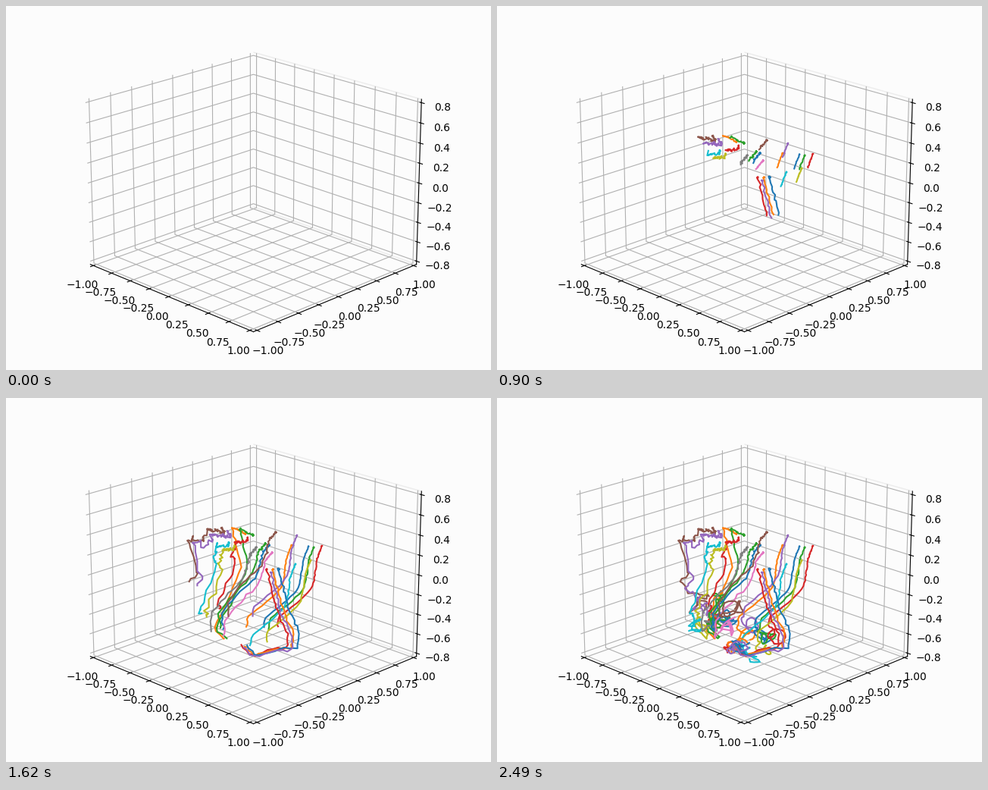
Animation, 640 px wide and 480 px high, one loop 2520 ms. Source, as a matplotlib script:

```python
import numpy as np
import matplotlib.pyplot as plt
from matplotlib.animation import FuncAnimation

FRAMES, INTERVAL = 84, 30
BACK = (0.988, 0.988, 0.988, 1)

fig = plt.figure(figsize=(6.4, 4.8), dpi=100, facecolor=BACK)

# Empty 3D box with a grid
box = fig.add_axes([0, 0, 1, 1], projection="3d", facecolor=BACK)
box.view_init(elev=20, azim=-45)
edge = 25 / 24
box.set(xlim=(-edge, edge), ylim=(-edge, edge), zlim=(-0.8 * edge, 0.8 * edge))
box.set_xticks(np.arange(-4, 5) / 4)
box.set_yticks(np.arange(-4, 5) / 4)
box.set_zticks(np.arange(-4, 5) / 5)
box.xaxis.set_pane_color((1, 1, 1, 0))
box.zaxis.set_pane_color((1, 1, 1, 0))
box.yaxis.set_pane_color(BACK)
box.yaxis.pane.set_edgecolor((0.925, 0.925, 0.925, 1))

# Trails are laid out in stage pixels on top of the box
stage = fig.add_axes([0, 0, 1, 1], facecolor="none")
stage.set(xlim=(0, 640), ylim=(480, 0))
stage.axis("off")

rng = np.random.default_rng(4)
steps = np.arange(1, FRAMES)
BEATS = [1, 15, 30, 38, 42, 46, 50, 54, 65, 83]
trails = []


def ramp(start, end):
    """Smooth rise from 0 to 1 between two steps."""
    u = np.clip((steps - start) / (end - start), 0, 1)
    return u * u * (3 - 2 * u)


def glide(shifts):
    """Softened path through one shift per beat."""
    path = np.pad(np.interp(steps, BEATS, shifts), 1, mode="edge")
    return np.convolve(path, [0.25, 0.5, 0.25], "valid")


def wander(size):
    """Slow random loops that set in once the drop is over."""
    waves = sum(np.sin(2 * np.pi * (steps / period + rng.random()))
                for period in rng.uniform(7, 22, 2))
    return size / 2 * ramp(52, 62) * waves


def bundle(dx, dy, rough, loops, gather, **starts):
    """Strands that share one motion, draw together and then tangle."""
    shared = np.column_stack([glide(dx), glide(dy)])
    centre = np.mean(list(starts.values()), axis=0)
    pull = gather * ramp(34, 54)[:, None]
    for color, start in starts.items():
        noise = rough * (0.3 + 0.7 * ramp(1, 30))[:, None]
        path = start + shared + pull * (centre - start)
        path += noise * rng.normal(size=path.shape)
        path += np.column_stack([wander(loops), wander(0.8 * loops)])
        line, = stage.plot([], [], color="tab:" + color, lw=1.5)
        trails.append((line, path))


# Upper cluster: a hook to the left, then a long drop
bundle([0, 0, -18, -13, -6, -22, -47, -30, -38, -20],
       [0, 0, -9, 14, 41, 82, 124, 139, 105, 68], 0.8, 13, 0.8,
       orange=(316, 179), green=(326, 181))

# Outer left: jagged, with a sudden fall
bundle([0, 4, -18, -25, -42, -43, -30, -42, -17, -20],
       [0, 9, 4, 20, 14, 18, 62, 73, 98, 108], 2, 13, 0.4,
       brown=(284, 170), purple=(292, 175))

# Inner left
bundle([0, -1, -15, -21, -17, -27, -39, -36, -32, -30],
       [0, 5, 6, 24, 31, 62, 88, 95, 106, 116], 1.4, 9, 0,
       red=(319, 184), olive=(302, 194), cyan=(294, 190))

# Middle: sweep down to the left
bundle([0, 0, -9, -13, -21, -43, -63, -60, -45, -40],
       [0, 0, 11, 30, 47, 66, 92, 112, 100, 97], 0.9, 15, 0.1,
       gray=(330, 197), green=(342, 192), blue=(347, 194),
       pink=(351, 204), brown=(356, 177))

# Right: the same sweep, smoother
bundle([0, 0, -7, -10, -14, -33, -58, -59, -50, -45],
       [0, 0, 18, 42, 57, 75, 94, 108, 116, 122], 0.4, 11, 0,
       orange=(377, 194), purple=(384, 181), blue=(399, 196),
       green=(406, 197), red=(417, 195), olive=(402, 214), cyan=(382, 219))

# Lowest: drop to the right, slide left and knot
bundle([0, 0, 12, 28, 26, 5, -25, -38, -43, -28],
       [0, 0, 49, 85, 104, 103, 114, 99, 104, 98], 0.9, 10, 0.6,
       red=(344, 226), orange=(352, 226), blue=(360, 226), purple=(350, 230))


def draw(frame):
    for line, path in trails:
        line.set_data(*path[:frame].T)
    return [line for line, _ in trails]


anim = FuncAnimation(fig, draw, frames=FRAMES, interval=INTERVAL, repeat=True)
plt.show()
```
